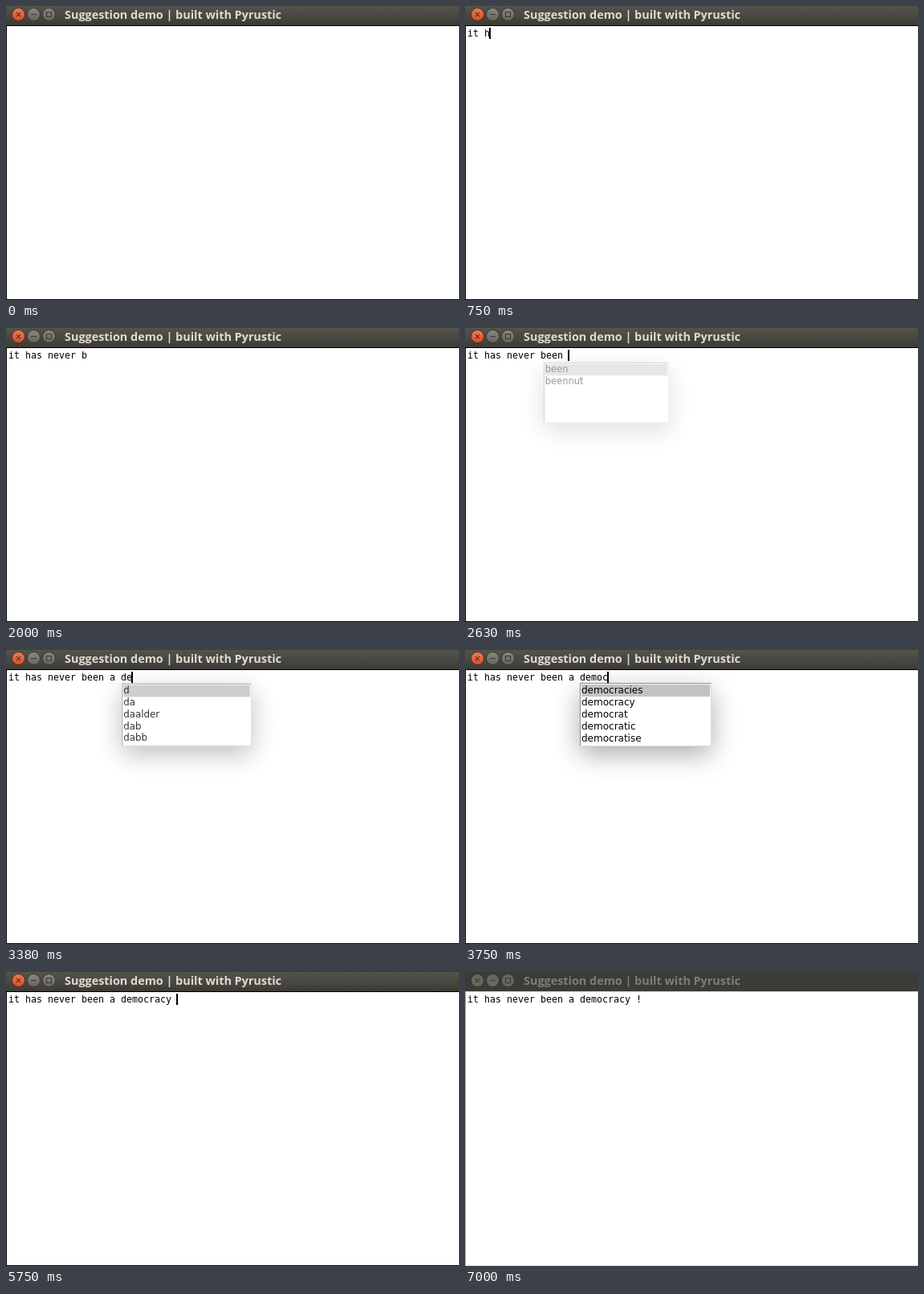
These frames come from a looping animation (564x366 px, 7130 ms). An HTML page:

```html
<!DOCTYPE html>
<html lang="en">
<head>
<meta charset="utf-8">
<title>Suggestion demo</title>
<style>
  html, body { margin: 0; width: 100%; height: 100%; overflow: hidden; background: #fff; }
  #stage { position: relative; width: 564px; height: 366px; overflow: hidden; background: #fff; }
  #stage * { box-sizing: border-box; }
  #bar { position: absolute; left: 0; top: 0; }
  #title { font: bold 14.4px "Open Sans", "Noto Sans", sans-serif; fill: #dfdbd2; }
  .button { stroke: #35342f; stroke-width: 1; fill: url(#greyButton); }
  .close { fill: url(#orangeButton); }
  .glyph { fill: none; stroke: #3a3934; stroke-width: 1.2; }
  #editor { position: absolute; left: 0; top: 24px; width: 566px; height: 342px;
            border: solid #000; border-width: 1px 0 1px 1px; }
  #line { position: absolute; left: 3px; top: 27px; white-space: pre; color: #000;
          font: 11.63px/14px "DejaVu Sans Mono", monospace; }
  #caret { position: absolute; top: 27px; width: 2px; height: 14px; background: #000; }
  #popup { position: absolute; top: 41px; width: 164px; height: 79px; padding: 1px;
           background: #fff; color: #000; border: 1px solid #8c8c8c;
           border-right-color: #dcdcdc; border-bottom-color: #dcdcdc;
           box-shadow: 0 10px 32px rgba(0, 0, 0, .33);
           font: 12px/14px "DejaVu Sans", sans-serif; }
  #popup div { height: 15px; white-space: pre; }
  #popup div:first-child { background: #c3c3c3; }

  .unfocused #barFill { fill: #3c3b37; }
  .unfocused #title { fill: #7f7d75; }
  .unfocused .button { fill: #686660; }
  .unfocused #editor { border-color: #d9d9d9 #d9d9d9 #d9d9d9 #96948e; }
</style>
</head>
<body>
<div id="stage">
  <div id="editor"></div>
  <svg id="bar" width="564" height="24">
    <defs>
      <linearGradient id="barShade" x2="0" y2="1">
        <stop stop-color="#55544a"/><stop offset="1" stop-color="#3c3b37"/>
      </linearGradient>
      <linearGradient id="greyButton" x2="0" y2="1">
        <stop stop-color="#8b8980"/><stop offset="1" stop-color="#65635c"/>
      </linearGradient>
      <linearGradient id="orangeButton" x2="0" y2="1">
        <stop stop-color="#f37b55"/><stop offset="1" stop-color="#dd4a20"/>
      </linearGradient>
    </defs>
    <rect id="barFill" width="564" height="24" fill="url(#barShade)"/>
    <circle class="button close" cx="15.5" cy="10.5" r="8"/>
    <circle class="button" cx="34.5" cy="10.5" r="8"/>
    <circle class="button" cx="53.5" cy="10.5" r="8"/>
    <path class="glyph" d="M12.8 7.8l5.4 5.4m0-5.4l-5.4 5.4M31 10.5h7M50.5 7.5h6v6h-6z"/>
    <text id="title" x="73" y="16">Suggestion demo | built with Pyrustic</text>
  </svg>
  <div id="line"></div>
  <div id="caret"></div>
  <div id="popup"></div>
</div>
<script>
const LOOP = 7130, STEP = 125, CELL = 7, LEFT = 3, UNFOCUS_STEP = 56;
const SENTENCE = "it has never been a democracy !";

// Step at which each character of the sentence is typed.
const TYPED_AT = [2, 3, 5, 6, 7, 8, 9, 10, 11, 12, 13, 14, 15, 16, 17, 18, 19,
                  21, 22, 24, 26, 27, 28, 29, 30, 31, 32, 33, 34, 44, 47];
const CARET_OFF = [[0, 2], [16, 17], [39, 42], [51, 53], [56, 58]];

const WORDS = {
  i: "i ia iamb iambi iambic",
  it: "it ita itabirite itacism itacist",
  h: "h ha haab haaf haafs",
  has: "has hasard hash hashab hashed",
  n: "n na naa naam nab",
  ne: "ne nea neaf neakes neal",
  nev: "nev neve nevel never nevermore",
  neve: "neve nevel never nevermore nevi",
  never: "never nevermass nevermind nevermore neverness",
  b: "b ba baa baaed baahling",
  bee: "bee beebee beebees beebread beech",
  been: "been beennut",
  a: "a aa aah aahed aahing",
  d: "d da daalder dab dabb",
  dem: "dem demagnetise demagnify demagog demagogic",
  demo: "demo demob demobbed demobbing demobilise",
  democ: "democracies democracy democrat democratic democratise"
};

// Each popup: sentence column, first step, then the listed prefix per step.
// It fades in on its first step and out on its last.
const POPUPS = [
  [0, 3, "i it it"],
  [3, 7, "h has has"],
  [7, 10, "n ne nev neve never never"],
  [13, 17, "b bee been been been"],
  [18, 23, "a a"],
  [20, 27, "d dem demo democ democ democ democ"]
].map(([column, start, prefixes]) => ({ column, start, prefixes: prefixes.split(" ") }));

const [stage, line, caret, popup] =
  ["stage", "line", "caret", "popup"].map(id => document.getElementById(id));

function drawPopup(step) {
  const active = POPUPS.find(p => step >= p.start && step < p.start + p.prefixes.length);
  popup.hidden = !active;
  popup.style.display = active ? "block" : "none";
  if (!active) return;
  const index = step - active.start;
  const opacity = index === 0 ? 0.8 : index === active.prefixes.length - 1 ? 0.4 : 1;
  popup.style.left = LEFT + CELL * active.column + "px";
  popup.style.opacity = opacity;
  popup.style.transform = `scale(${1 - (1 - opacity) * 0.08})`;
  popup.replaceChildren(...WORDS[active.prefixes[index]].split(" ").map(word => {
    const row = document.createElement("div");
    row.textContent = word;
    return row;
  }));
}

function draw(step) {
  const typed = TYPED_AT.filter(at => at <= step).length;
  const caretOff = CARET_OFF.some(([from, to]) => step >= from && step < to);
  line.textContent = SENTENCE.slice(0, typed);
  caret.style.left = LEFT - 1 + CELL * typed + "px";
  caret.style.display = caretOff ? "none" : "block";
  stage.classList.toggle("unfocused", step >= UNFOCUS_STEP);
  drawPopup(step);
}

const begin = performance.now();
let shown = -1;
function tick() {
  const time = Math.max(0, performance.now() - begin) % LOOP;
  const step = Math.floor(time / STEP);
  if (step !== shown) draw(shown = step);
  requestAnimationFrame(tick);
}
tick();
</script>
</body>
</html>
```
